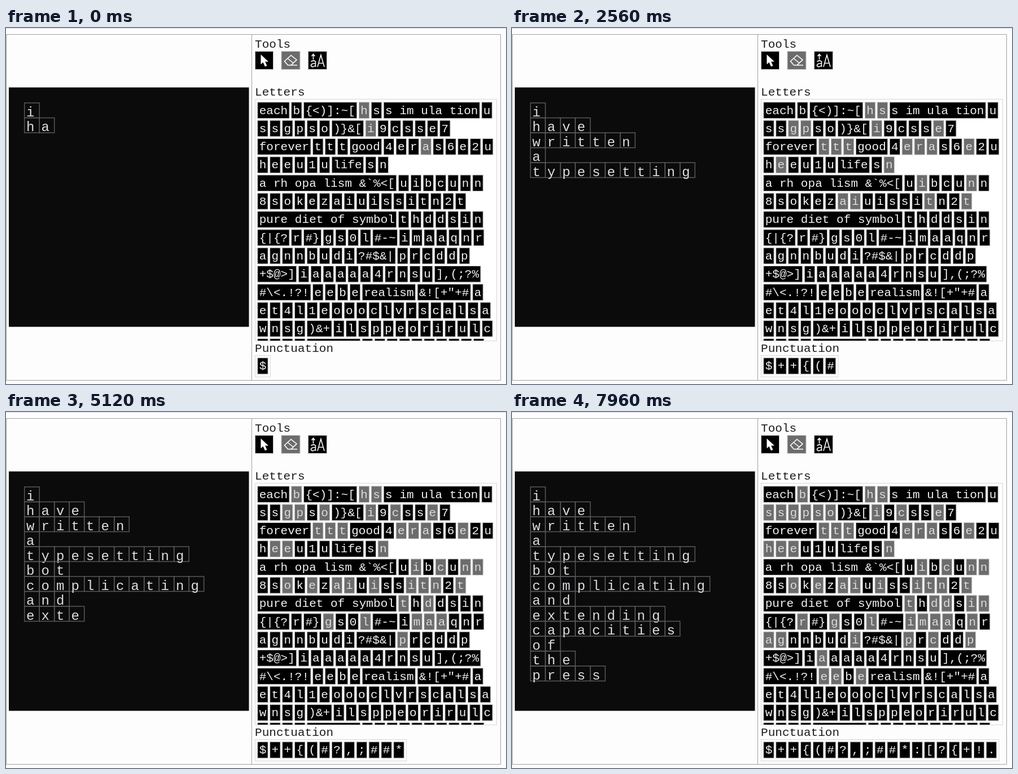
An HTML page that plays this animation: 886 px wide and 632 px high, repeating every 8 s.

```html
<!DOCTYPE html>
<html lang="en">
<head>
<meta charset="utf-8">
<title>Typesetting bot</title>
<style>
  html, body { margin: 0; width: 100%; height: 100%; overflow: hidden; background: #fdfdfd; }
  svg { display: block; width: 886px; height: 632px; }
  text { font: 21.08px "Liberation Mono", "Courier New", monospace; fill: #1c1c1c; }
  .frame { fill: none; stroke: #a2a2a2; }
  .box { fill: #fff; stroke: #d8d8d8; }
  .tile rect { fill: #000; stroke: #c4c4c4; }
  .tile text { fill: #f2f2f2; text-anchor: middle; }
  .spent rect { fill: #6c6c6c; }
  .spent text { fill: #dcdcdc; }
  .cell rect { fill: none; stroke: #58585c; stroke-width: 1.5; }
  .cell text { font-size: 24px; fill: #dedede; text-anchor: middle; }
  .icon { fill: none; stroke: #fff; stroke-width: 1.6; }
</style>
</head>
<body>
<svg id="stage" viewBox="0 0 886 632">
  <defs><clipPath id="listClip"><rect x="441" y="127" width="429" height="428"/></clipPath></defs>
  <path d="M0 .5H886" stroke="#d6d6ea"/>
  <path class="frame" d="M.5 11.5H876.5V625.5H.5ZM435.5 11.5V625.5"/>
  <rect x="5" y="105.5" width="425.5" height="425" fill="#0b0b0b"/>
  <g id="page"></g>

  <text x="441" y="35">Tools</text>
  <g class="tile"><rect x="441.5" y="41.5" width="32" height="32"/></g>
  <path d="M451.5 47V64.5L455.5 61L459 68.5L462.5 67L459.2 59.8H465Z" fill="#fff"/>
  <g class="tile spent"><rect x="488" y="41.5" width="33" height="32"/></g>
  <path class="icon" d="M493.5 59L505 48.5L515 56.5L505 66H499.5ZM499 54L509.5 62.5M499.5 66H516"/>
  <g class="tile"><rect x="535.5" y="41.5" width="33" height="32"/></g>
  <path class="icon" d="M552 69L558 48L564 69M554 62.5H562M540.5 59.5Q546 56 548.5 60V69M548.5 63Q540 62.5 540.5 67Q543 71 548.5 66.5M544.5 56V47M541.5 50L544.5 46.5L547.5 50"/>

  <text x="441" y="120">Letters</text>
  <rect class="box" x="441.5" y="126.5" width="428" height="429"/>
  <g id="list" clip-path="url(#listClip)"></g>

  <text x="441" y="575">Punctuation</text>
  <rect id="tray" class="box" x="441.5" y="581.5" width="27" height="38"/>
  <g id="marks"></g>
</svg>
<script>
const LOOP = 8000, TICK = 100.7;
const CHAR = 12.65, PAD = 9.27, ROW = 32.3, CELL = 26.5;
const START = 4;
const WORDS = 'i have written a typesetting bot complicating and extending capacities of the press';

// a leading "*" gives every letter of the chunk its own tile
const ROWS = [
  ['each', '*b', '{<)]:~[', '*hs', 's im ula tion', '*u'],
  ['*ssgpso', ')}&[', '*i9csse7'],
  ['forever', '*ttt', 'good', '*4eras6e2u'],
  ['*heeu1u', 'life', '*sn'],
  ['a rh opa lism &`%<[', '*uibcunn'],
  ['*8sokezaiuissitn2t'],
  ['pure diet of symbol', '*thddsin'],
  ['{|{?', '*r', '#}', '*gs0l', '#-~', '*imaaqnr'],
  ['*agnnbudi', '?#$&|', '*prcddp'],
  ['+$@>]', '*iaaaaa4rnsu', '],(;?%'],
  ['#\\<.!?!', '*eebe', 'realism', '&![+"+#', '*a'],
  ['*et4l1eoooclvrscalsa'],
  ['*wnsg', ')&+', '*ilsppeorirulc'],
  ['*unes', 'letters', '*arsotrinap']
];
const REACH = 11; // rows of the stock the bot takes letters from
const MARKS = '$++{(#?,;##*:[?{+!.';
const MARK_TICKS = [0, 13, 15, 18, 21, 23, 31, 39, 41, 44, 46, 48, 53, 56, 59, 62, 68, 72, 77];

const $ = id => document.getElementById(id);

function add(parent, tag, attrs, content) {
  const node = document.createElementNS('http://www.w3.org/2000/svg', tag);
  for (const key in attrs) node.setAttribute(key, attrs[key]);
  if (content) node.textContent = content;
  return parent.appendChild(node);
}

function addTile(parent, label, x, y) {
  const width = label.length * CHAR + PAD;
  const node = add(parent, 'g', { class: 'tile' });
  add(node, 'rect', { x: x + 1.8, y, width: width - 3.6, height: 28.6 });
  add(node, 'text', { x: x + width / 2, y: y + 20.7 }, label);
  return { node, label, right: x + width };
}

const tiles = [];
ROWS.forEach((chunks, row) => {
  let x = 444;
  for (const chunk of chunks) {
    const labels = chunk[0] === '*' ? [...chunk.slice(1)] : [chunk];
    for (const label of labels) {
      const tile = addTile($('list'), label, x, 131.8 + row * ROW);
      tile.free = row < REACH;
      tiles.push(tile);
      x = tile.right;
    }
  }
});

// each typed letter takes the first free tile bearing it
let row = 0, col = 0;
const steps = [...WORDS].map(letter => {
  if (letter === ' ') { row++; col = 0; return null; }
  const x = 32.7 + col++ * CELL, y = 133 + row * CELL;
  const cell = add($('page'), 'g', { class: 'cell' });
  add(cell, 'rect', { x, y, width: CELL, height: CELL });
  add(cell, 'text', { x: x + 10.5, y: y + 23.7 }, letter);
  const tile = tiles.find(t => t.free && t.label === letter);
  if (tile) tile.free = false;
  return { cell, tile };
});

const marks = [...MARKS].map((mark, i) =>
  addTile($('marks'), mark, 444 + i * (CHAR + PAD), 585.7).node);

const show = (node, on) => node.setAttribute('visibility', on ? 'visible' : 'hidden');

function render(now) {
  const tick = Math.floor((now % LOOP) / TICK);
  steps.forEach((step, i) => {
    if (!step) return;
    const typed = i < START + tick;
    show(step.cell, typed);
    if (step.tile) step.tile.node.classList.toggle('spent', typed);
  });
  const count = MARK_TICKS.filter(t => t <= tick).length;
  marks.forEach((mark, i) => show(mark, i < count));
  $('tray').setAttribute('width', 5 + (CHAR + PAD) * count);
}

let origin;
function loop(now) {
  origin ??= now;
  render(now - origin);
  requestAnimationFrame(loop);
}
render(0);
requestAnimationFrame(loop);
</script>
</body>
</html>
```
